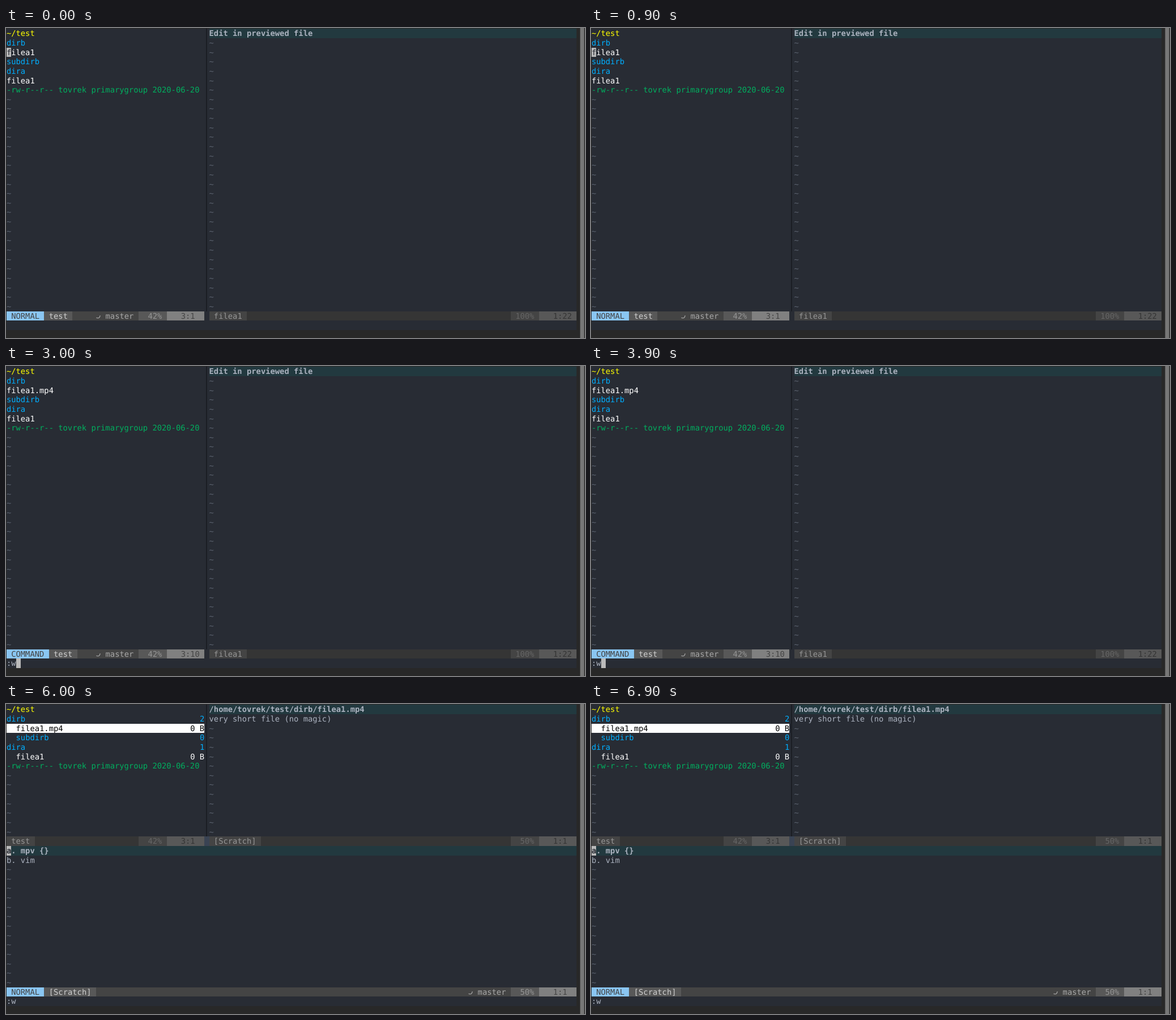
Animation, 1022 px wide and 548 px high, one loop 7.5 s. Source, as an HTML page:

```html
<!DOCTYPE html>
<html lang="en">
<head>
<meta charset="utf-8">
<title>File manager in an editor</title>
<style>
  html, body { margin: 0; width: 100%; height: 100%; overflow: hidden; background: #282828; }
  svg { display: block; width: 1022px; height: 548px; }
  rect { shape-rendering: crispEdges; }
  text {
    font-family: "DejaVu Sans Mono", monospace;
    font-size: 13.8145px;
    text-rendering: geometricPrecision;
    white-space: pre;
  }
</style>
</head>
<body>
<svg id="stage" viewBox="0 0 1022 548"></svg>
<script>
const CELL_W = 8.317, CELL_H = 16.64, LEFT = 0.9, TOP = 1.3, BASELINE = 13;
const STEP = 1500;
const COLS = 121, SPLIT = 42, STATUS = 30, CMD = 31;

const C = {
  bg: '#282c34', fg: '#abb2bf', tilde: '#5c6370', line: '#22393f', rule: '#1b1e24',
  path: '#ffff00', dir: '#00afff', info: '#00af5f', file: '#ffffff', cursor: '#bababa',
  blue: '#8ac6f2', green: '#95e454',
  g35: '#353535', g44: '#444444', g58: '#585858', g66: '#666666',
  g80: '#808080', g96: '#969696', ga8: '#a8a8a8', gd0: '#d0d0d0'
};

const stage = document.getElementById('stage');
let layer = stage;

function add(tag, attrs, content = '') {
  const el = document.createElementNS('http://www.w3.org/2000/svg', tag);
  for (const key in attrs) el.setAttribute(key, attrs[key]);
  el.textContent = content;
  return layer.appendChild(el);
}
const px = col => LEFT + col * CELL_W;
const py = row => TOP + row * CELL_H;

function fill(col, row, cols, color, rows = 1) {
  add('rect', { x: px(col), y: py(row), width: cols * CELL_W, height: rows * CELL_H, fill: color });
}
function write(col, row, str, color, bold = false) {
  add('text', { x: px(col), y: py(row) + BASELINE, fill: color, 'font-weight': bold ? 700 : 400 }, str);
}
function tildes(col, from, to) {
  for (let row = from; row <= to; row++) write(col, row, '~', C.tilde);
}
function cursor(col, row, char = '', bold = false) {
  fill(col, row, 1, C.cursor);
  write(col, row, char, C.bg, bold);
}
function label(col, row, str, color, back) {
  fill(col, row, str.length + 2, back);
  write(col + 1, row, str, color);
  return col + str.length + 2;
}
function meters(end, row, percent, pos, active) {
  fill(end - 14, row, 6, active ? C.g58 : C.g44);
  fill(end - 8, row, 8, active ? C.g80 : C.g58);
  write(end - 9 - percent.length, row, percent, active ? C.g96 : C.g66);
  write(end - 5, row, pos, active ? C.g44 : C.g35);
}
function activeBar(start, end, row, mode, name, percent, pos) {
  fill(start, row, end - start, C.g44);
  const next = label(start, row, mode, C.g44, mode === 'INSERT' ? C.green : C.blue);
  label(next, row, name, C.gd0, C.g58);
  const x = px(end - 23), y = py(row);
  add('path', {
    d: `M${x + .6} ${y + 11.6}Q${x + 6.6} ${y + 14} ${x + 7.2} ${y + 7.6}`,
    fill: 'none', stroke: C.ga8, 'stroke-width': 1.2
  });
  write(end - 21, row, 'master', C.ga8);
  meters(end, row, percent, pos, true);
}
function idleBar(start, end, row, name, percent, pos) {
  fill(start, row, end - start, C.g35);
  label(start, row, name, C.g96, C.g44);
  meters(end, row, percent, pos, false);
}

function separator(rows) {
  add('rect', { x: px(SPLIT) + 3.1, y: py(0), width: 2, height: rows * CELL_H, fill: C.rule });
}
function listing(lastRow, rows) {
  write(0, 0, '~/test', C.path);
  rows.forEach(([indent, name, color, size = ''], i) => {
    write(indent, i + 1, name, color);
    write(SPLIT - size.length, i + 1, size, color);
  });
  write(0, 6, '-rw-r--r-- tovrek primarygroup 2020-06-20', C.info);
  tildes(0, 7, lastRow);
  separator(lastRow + 1);
}
function preview(lastRow, title, body) {
  fill(SPLIT + 1, 0, COLS - SPLIT - 1, C.line);
  write(SPLIT + 1, 0, title, C.fg, true);
  if (body) write(SPLIT + 1, 1, body, C.fg);
  tildes(SPLIT + 1, body ? 2 : 1, lastRow);
}

function editing(mode, name, pos) {
  listing(29, [
    [0, 'dirb', C.dir], [0, name, C.file], [0, 'subdirb', C.dir],
    [0, 'dira', C.dir], [0, 'filea1', C.file]
  ]);
  preview(29, 'Edit in previewed file');
  activeBar(0, SPLIT, STATUS, mode, 'test', '42%', pos);
  idleBar(SPLIT + 1, COLS, STATUS, 'filea1', '100%', '1:22');
}
function browsing(lastRow) {
  fill(0, 2, SPLIT, '#ffffff');
  listing(lastRow, [
    [0, 'dirb', C.dir, '2'], [2, 'filea1.mp4', '#000000', '0 B'], [2, 'subdirb', C.dir, '0'],
    [0, 'dira', C.dir, '1'], [2, 'filea1', C.file, '0 B']
  ]);
  preview(lastRow, '/home/tovrek/test/dirb/filea1.mp4', 'very short file (no magic)');
  idleBar(0, SPLIT, lastRow + 1, 'test', '42%', '3:1');
  write(0, CMD, ':w', C.fg);
}

const scenes = [
  () => {
    editing('NORMAL', 'filea1', '3:1');
    cursor(0, 2, 'f');
  },
  () => {
    editing('INSERT', 'filea1.mp4', '3:11');
    add('rect', { x: px(10), y: py(2), width: 1, height: CELL_H, fill: C.gd0 });
    write(0, CMD, '-- INSERT --', C.fg, true);
  },
  () => {
    editing('COMMAND', 'filea1.mp4', '3:10');
    write(0, CMD, ':w', C.fg);
    cursor(2, CMD);
  },
  () => {
    browsing(29);
    cursor(0, 2);
    activeBar(SPLIT + 1, COLS, STATUS, 'NORMAL', '[Scratch]', '50%', '1:1');
  },
  () => {
    browsing(13);
    fill(SPLIT, 14, 1, '#3a4353');
    idleBar(SPLIT + 1, COLS, 14, '[Scratch]', '50%', '1:1');
    fill(0, 15, COLS, C.line);
    write(1, 15, '. mpv {}', C.fg, true);
    cursor(0, 15, 'a', true);
    write(0, 16, 'b. vim', C.fg);
    tildes(0, 17, 29);
    activeBar(0, COLS, STATUS, 'NORMAL', '[Scratch]', '50%', '1:1');
  }
];

// Window background and scrollbar
fill(0, 0, COLS, C.bg, 32);
add('rect', { x: 1013, y: 0, width: 8, height: 548, fill: '#555555' });
add('rect', { x: 1014, y: 0, width: 6, height: 548, fill: '#777777' });

const share = 1 / scenes.length, duration = STEP * scenes.length;
scenes.forEach((draw, i) => {
  layer = stage;
  layer = add('g', {});
  draw();
  layer.animate([
    { visibility: 'visible', offset: 0, easing: 'steps(1, end)' },
    { visibility: 'hidden', offset: share, easing: 'steps(1, end)' },
    { visibility: 'hidden', offset: 1 }
  ], { duration, delay: i * STEP - duration, iterations: Infinity });
});
</script>
</body>
</html>
```
